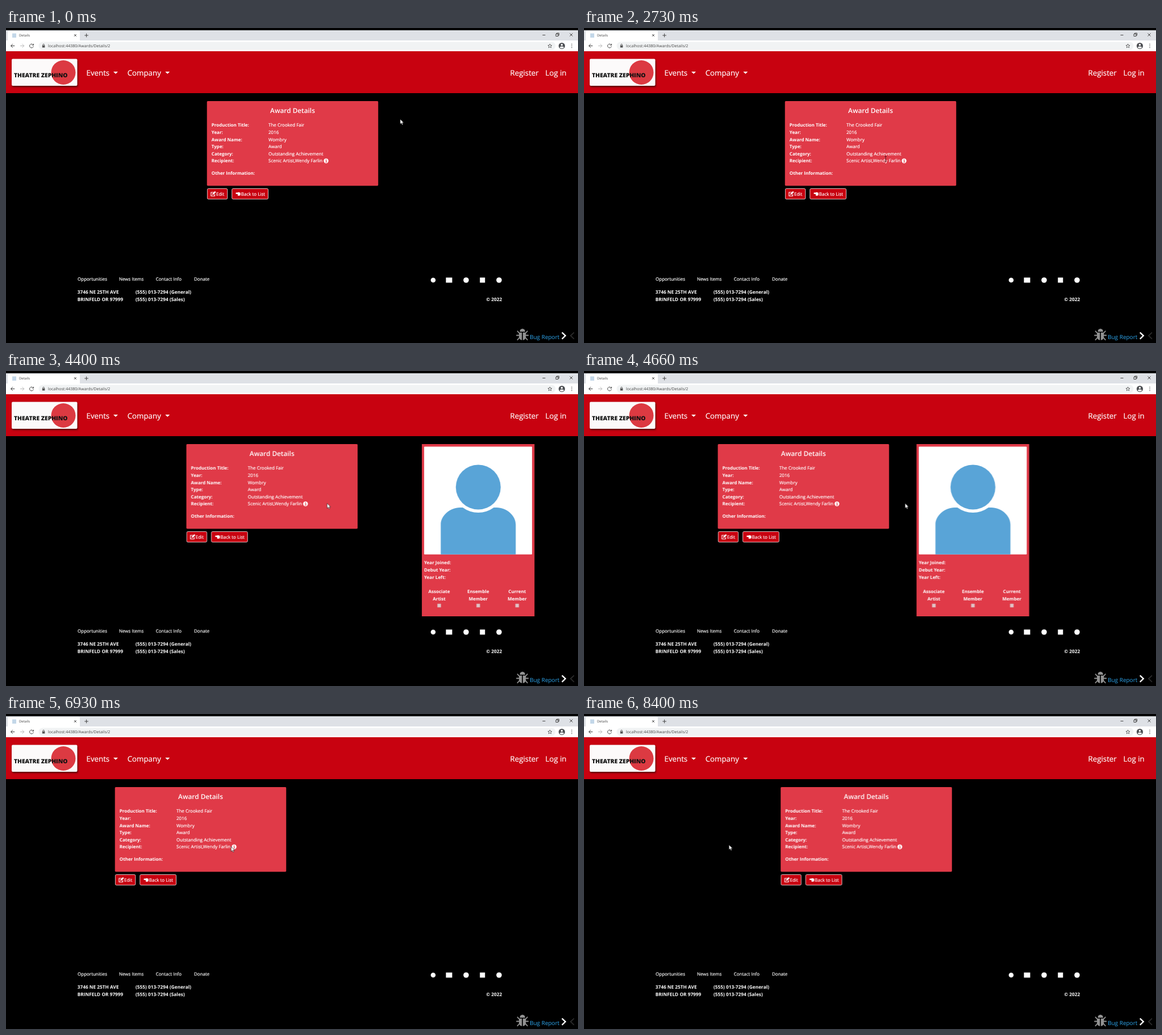
Write an HTML page that moves like this. It is 1007 by 556 pixels and loops after 9670 ms.

```html
<!DOCTYPE html>
<html lang="en">
<head>
<meta charset="utf-8">
<title>Award details</title>
<style>
  html, body { margin: 0; width: 100%; height: 100%; overflow: hidden; background: #000; }
  svg { display: block; }
  text {
    font: 400 8px "Open Sans", "Noto Sans", sans-serif;
    fill: #fff; stroke: #fff; stroke-width: .18;
    white-space: pre; text-rendering: geometricPrecision;
  }
  .bold text { font-weight: 700; stroke: none; }
  .address text { font-size: 8.3px; }
  .nav text { font-size: 13.3px; }
  .title { font-size: 11.8px; font-weight: 600; stroke: none; }
  .mid, .mid text { text-anchor: middle; }
  .chrome text { fill: #444; stroke: none; }
  .line { fill: none; stroke: #444; stroke-width: 1; }
  .button { fill: #c80210; stroke: #f3dada; stroke-width: .9; }
  .plate { fill: #fcfafa; filter: drop-shadow(1.5px 2px 1.5px rgba(0, 0, 0, .6)); }

  #card, #profile, #footer, #cursor, #arrow, #beam { animation: 9670ms linear infinite; }
  #card { animation-name: card; }
  #profile { animation-name: slide, reveal; }
  #footer { animation-name: footer; }
  #cursor { animation-name: cursor; }
  #arrow { animation-name: arrow; }
  #beam { animation-name: beam; }

  @keyframes card {
    0% { transform: translate(353.5px, 0); }
    43.79% { transform: translate(353.5px, 0); animation-timing-function: ease; }
    54.13% { transform: translate(189px, 0); }
    71.065% { transform: translate(189px, 0); animation-timing-function: cubic-bezier(.295, .09, .335, .807); }
    86.866%, 100% { transform: translate(346px, 0); }
  }
  @keyframes slide {
    0% { transform: translate(797px, 0); }
    43.79% { transform: translate(797px, 0); animation-timing-function: ease; }
    54.13%, 100% { transform: translate(502.6px, 0); }
  }
  @keyframes reveal {
    0%, 43.78% { opacity: 0; }
    43.79%, 71.06% { opacity: 1; }
    71.065%, 100% { opacity: 0; }
  }
  @keyframes footer {
    0%, 43.78% { transform: translate(0, 0); }
    43.79%, 100% { transform: translate(0, 15.8px); }
  }
  @keyframes cursor {
    0% { transform: translate(694px, 161px); }
    2.07% { transform: translate(694px, 161px); animation-timing-function: ease-in-out; }
    6.2% { transform: translate(655px, 203px); }
    15.82% { transform: translate(655px, 203px); animation-timing-function: ease-in-out; }
    23.37%, 24.82% { transform: translate(548px, 233px); }
    28.23% { transform: translate(531px, 231px); animation-timing-function: ease-in-out; }
    34.44% { transform: translate(564px, 233px); }
    39.9%, 50.7% { transform: translate(565.3px, 233.6px); }
    53.77% { transform: translate(520px, 238px); animation-timing-function: ease-out; }
    66% { transform: translate(396.3px, 234px); }
    72% { transform: translate(396.3px, 234px); animation-timing-function: ease-in-out; }
    86%, 100% { transform: translate(255.3px, 231px); }
  }
  @keyframes arrow {
    0%, 23.3% { opacity: 1; }
    23.31%, 33% { opacity: 0; }
    33.01%, 100% { opacity: 1; }
  }
  @keyframes beam {
    0%, 23.3% { opacity: 0; }
    23.31%, 33% { opacity: 1; }
    33.01%, 100% { opacity: 0; }
  }
</style>
</head>
<body>
<svg width="1007" height="556" viewBox="0 0 1007 556">
  <rect width="1007" height="556"/>

  <!-- browser window -->
  <g class="chrome">
    <path d="M0 4H1007V41H0z" fill="#dee1e6"/>
    <path d="M0 22H1007V41H0zM3 22V8q0-3 3-3H127q3 0 3 3V22z" fill="#fff"/>
    <rect x="57.500" y="24.500" width="910" height="14" rx="7" fill="#f1f3f4"/>
    <rect x="11" y="9.500" width="7" height="7.500" fill="#c3d7e8"/>
    <text x="23" y="15.300" style="font-size:6px">Details</text>
    <path class="line" d="M120 11l3.800 3.800m0-3.800l-3.800 3.800M138.300 13h6.600m-3.300-3.300v6.600"/>
    <path class="line" d="M944.500 12.500h5M968 10.500h4v4h-4zM969.500 10.500v-1.500h4v4h-1.500M992.500 9.500l5 5m0-5l-5 5"/>
    <path class="line" d="M15.300 31.500H8.500m3.300-3.300l-3.300 3.300 3.300 3.300M47.600 29.500a3.400 3.400 0 1 0 .7 2.700M48.500 27.800v2.400h-2.400"/>
    <path class="line" d="M25 31.500h6.800m-3.300-3.300l3.300 3.300-3.300 3.300" style="stroke:#bbb"/>
    <path d="M63.800 30.700h4.600v3.800h-4.600z" fill="#555"/>
    <path class="line" d="M64.800 31v-1.400a1.300 1.300 0 0 1 2.600 0V31" style="stroke-width:.8"/>
    <text x="74" y="34" style="font-size:7px">localhost:44380/Awards/Details/2</text>
    <path class="line" d="M957.500 28l1 2.400 2.500.2-1.900 1.700.6 2.500-2.200-1.400-2.200 1.400.6-2.500-1.900-1.700 2.500-.2z" style="stroke-width:.8"/>
    <circle cx="978.500" cy="31.500" r="5.600" fill="#4d4f53"/>
    <circle cx="978.500" cy="29.800" r="1.800" fill="#fff"/>
    <path d="M975 34.700q0-2.300 3.500-2.300t3.500 2.300q-3.500 2.600-7 0z" fill="#fff"/>
    <path d="M996 28.500v.01M996 31.500v.01M996 34.500v.01" stroke="#444" stroke-width="1.500" stroke-linecap="round"/>
  </g>

  <!-- site header -->
  <rect y="41" width="1007" height="74" fill="#c80210"/>
  <rect class="plate" x="10" y="54.500" width="115.500" height="47.500" rx="2"/>
  <circle cx="101" cy="78.500" r="21.500" fill="#dc3a42"/>
  <text x="14" y="87" style="font-size:10.300px;font-weight:800;fill:#111;stroke:none">THEATRE ZEPHINO</text>
  <g class="nav">
    <text x="141.500" y="84">Events</text>
    <text x="213.700" y="84">Company</text>
    <text x="887.500" y="84">Register</text>
    <text x="949.500" y="84">Log in</text>
  </g>
  <path d="M189 77h8l-4 4zM280.300 77h8l-4 4z" fill="#fff"/>

  <!-- award card -->
  <g id="card">
    <rect y="129" width="302" height="149.500" rx="2" fill="#e03a48"/>
    <text class="title mid" x="151" y="150.300">Award Details</text>
    <g class="bold">
      <text x="8.300" y="174.300">Production Title:</text>
      <text x="8.300" y="186.900">Year:</text>
      <text x="8.300" y="199.600">Award Name:</text>
      <text x="8.300" y="212.300">Type:</text>
      <text x="8.300" y="224.900">Category:</text>
      <text x="8.300" y="237.400">Recipient:</text>
      <text x="8.300" y="258.500">Other Information:</text>
    </g>
    <text x="108.500" y="174.300">The Crooked Fair</text>
    <text x="108.500" y="186.900">2016</text>
    <text x="108.500" y="199.600">Wombry</text>
    <text x="108.500" y="212.300">Award</text>
    <text x="108.500" y="224.900">Outstanding Achievement</text>
    <text x="108.500" y="237.400">Scenic Artist,Wendy Farlin</text>
    <circle cx="210" cy="234.500" r="4.200" fill="#fff"/>
    <path d="M209 233.700h1.500v3m-1.700 0h2.600M210 231.500v1.300" fill="none" stroke="#e03a48" stroke-width="1.100"/>

    <rect class="button" x=".9" y="283.500" width="35.400" height="18.500" rx="2"/>
    <path d="M12.500 290h-5v6.500h6.500v-3.300" fill="none" stroke="#fff" stroke-width="1.200"/>
    <path d="M9.600 294.500l.5-2.300 4.200-4.200 1.800 1.800-4.200 4.200z" fill="#fff"/>
    <text x="16.500" y="295.900">Edit</text>
    <rect class="button" x="44.300" y="283.500" width="63.700" height="18.500" rx="2"/>
    <path d="M51 291.400q0-.8.800-.8h2.500l1.300-.9 3.600 1.100v4.500l-2.400.6h-1.500q-1-.4-1-1.500 0-1 .4-1.400h-2.900q-.8 0-.8-.8z" fill="#fff"/>
    <text x="60.300" y="295.900">Back to List</text>
  </g>

  <!-- recipient profile -->
  <g id="profile">
    <rect y="129" width="198.300" height="304" fill="#e03a48"/>
    <rect x="4" y="133.500" width="190" height="190.300" rx="1" fill="#fff"/>
    <g fill="#59a4d7">
      <circle cx="99.300" cy="205" r="39.500"/>
      <path d="M33.300 323.800V271C33.300 255 50 241 67 241H72A45.500 45.500 0 0 0 126.600 241H131.600C149 241 165.300 255 165.300 271V323.800z"/>
    </g>
    <g class="bold">
      <text x="4" y="341.400">Year Joined:</text>
      <text x="4" y="354.100">Debut Year:</text>
      <text x="4" y="366.700">Year Left:</text>
      <g class="mid">
        <text x="30.500" y="392">Associate</text>
        <text x="30.500" y="404.600">Artist</text>
        <text x="99.200" y="392">Ensemble</text>
        <text x="99.200" y="404.600">Member</text>
        <text x="167.800" y="392">Current</text>
        <text x="167.800" y="404.600">Member</text>
      </g>
    </g>
    <path d="M27.500 411h6v6h-6zM96.200 411h6v6h-6zM164.800 411h6v6h-6z" fill="#e3c3c6" stroke="#d5989e" stroke-width=".7"/>
  </g>

  <!-- site footer -->
  <g id="footer">
    <text x="126" y="446.300">Opportunities</text>
    <text x="199" y="446.300">News Items</text>
    <text x="263.700" y="446.300">Contact Info</text>
    <text x="331" y="446.300">Donate</text>
    <g class="bold address">
      <text x="125.700" y="468.800">3746 NE 25TH AVE</text>
      <text x="125.700" y="481.500">BRINFELD OR 97999</text>
      <text x="228" y="468.800">(555) 013-7294 (General)</text>
      <text x="228" y="481.500">(555) 013-7294 (Sales)</text>
      <text x="873.300" y="481.500" text-anchor="end">© 2022</text>
    </g>
    <g fill="#fff">
      <circle cx="752" cy="445" r="4.300"/>
      <rect x="774.500" y="440.500" width="11" height="9"/>
      <circle cx="810" cy="445" r="4.800"/>
      <rect x="834.300" y="440.500" width="9" height="9"/>
      <circle cx="868" cy="445" r="4.800"/>
    </g>
  </g>

  <!-- bug report -->
  <g fill="#929292" stroke="#929292">
    <path d="M904.500 536a4.700 5.200 0 0 1 9.400 0z" stroke="none"/>
    <path d="M903 537.500h5.300V551q-5.300-1-5.300-7zM910 537.500h5.300V544q0 6-5.300 7z" stroke="none"/>
    <path d="M903.500 538.500l-3-3.300M903 542.500h-4M903.800 546.500l-3.300 3.800M914.800 538.500l3-3.300M915.300 542.500h4M914.500 546.500l3.300 3.800" fill="none" stroke-width="1.800" stroke-linecap="round"/>
  </g>
  <text x="922" y="548.700" style="font-size:10px;fill:#2da5ec;stroke:none">Bug Report</text>
  <path d="M978.800 537.300l6 5.800-6 5.800" fill="none" stroke="#fff" stroke-width="2.300"/>
  <path d="M1000 537.300l-6 5.800 6 5.800" fill="none" stroke="#2c2c2c" stroke-width="1.800"/>

  <g id="cursor">
    <path id="arrow" d="M0 0V8.600l2-1.800 1.400 3.100 1.500-.7-1.400-3h2.700z" fill="#fff" stroke="#111" stroke-width=".6"/>
    <path id="beam" d="M-1.700-4.500h1.200q.5 0 .5.500 0-.5.500-.5h1.200M0-4v8M-1.700 4.500h1.200q.5 0 .5-.5 0 .5.500.5h1.200" fill="none" stroke="#2b0a0d" stroke-width=".8"/>
  </g>
</svg>
</body>
</html>
```
